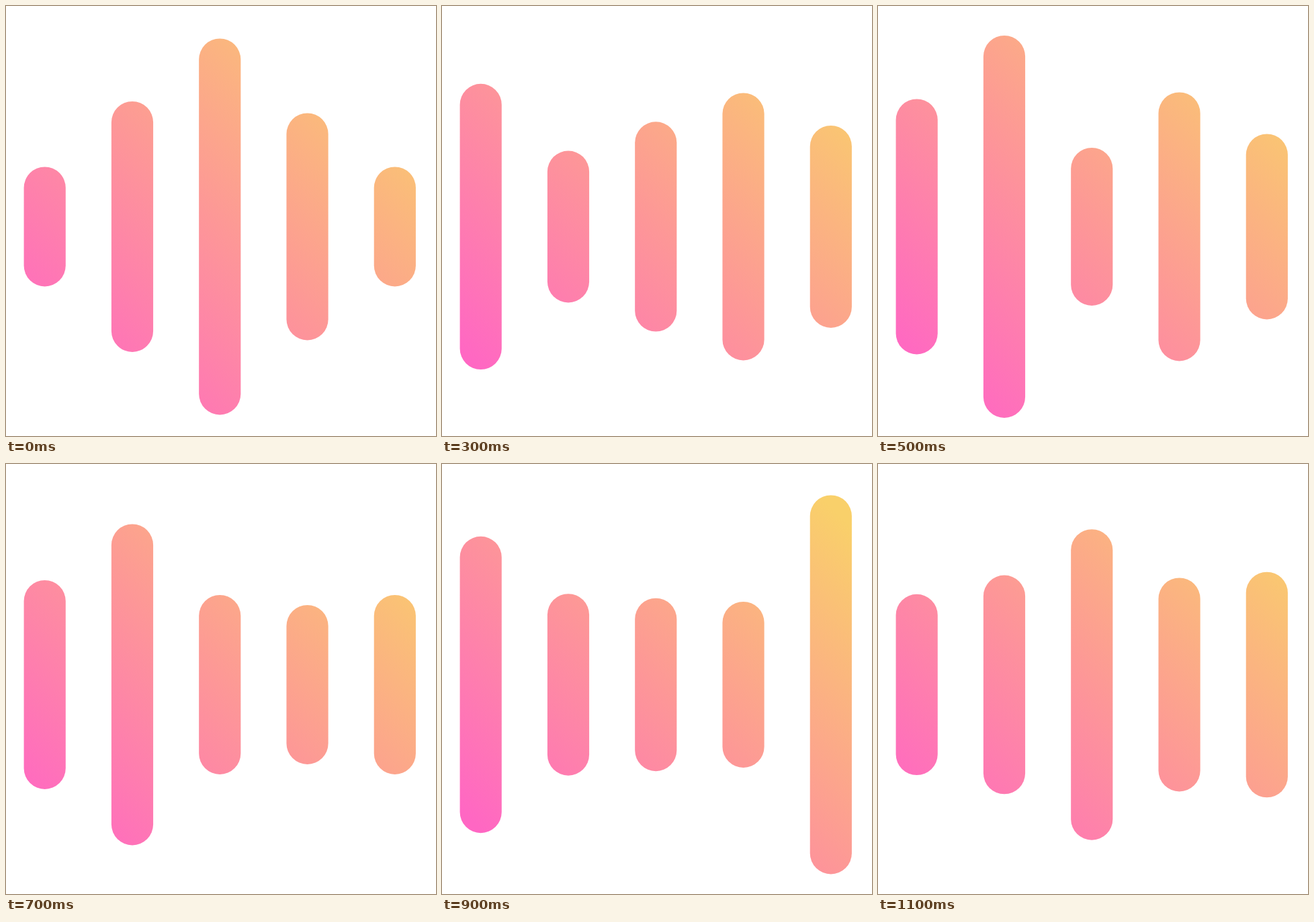
Recreate the animation shown at these times as an HTML page. Size 640 by 640 pixels, loop 1.2 s.

```html
<!DOCTYPE html>
<html lang="en">
<head>
<meta charset="utf-8">
<title>Sound bars</title>
<style>
  html, body { margin: 0; width: 100%; height: 100%; overflow: hidden; background: #fff; }
  svg { display: block; width: 100%; height: 100%; }
</style>
</head>
<body>
<svg viewBox="0 0 640 640">
  <defs>
    <linearGradient id="tint" gradientUnits="userSpaceOnUse" x1="76" y1="564" x2="578" y2="62">
      <stop offset="0" stop-color="#ff67c3"/>
      <stop offset=".475" stop-color="#fd9797"/>
      <stop offset="1" stop-color="#f9d06a"/>
    </linearGradient>
  </defs>
  <g id="bars" fill="url(#tint)"></g>
</svg>
<script>
  const STEP = 100, STEPS = 12;
  const LEFT = 26.6, PITCH = 130.28, WIDTH = 62.2, MID = 328.45;

  // Key heights of each bar at the shared key steps; a spline fills the rest
  const keySteps = [0, 2, 4, 5, 7, 8, 10];
  const keyHeights = [
    [178, 378, 440, 380, 311, 444, 392],
    [373, 251, 267, 569, 478, 314, 269],
    [560, 432, 204, 235, 267, 213, 334],
    [338, 364, 427, 400, 237, 210, 291],
    [178, 289, 296, 276, 267, 533, 510]
  ];

  // Key i of a looping track, counted past either end
  function keyAt(track, i) {
    const n = keySteps.length, k = (i + n) % n;
    return { t: keySteps[k] + Math.floor(i / n) * STEPS, h: track[k] };
  }

  function slopeAt(track, i) {
    const a = keyAt(track, i - 1), b = keyAt(track, i + 1);
    return (b.h - a.h) / (b.t - a.t);
  }

  // Smooth cubic through the keys
  function heightAt(track, step) {
    const i = keySteps.filter(t => t <= step).length - 1;
    const a = keyAt(track, i), b = keyAt(track, i + 1);
    const span = b.t - a.t, u = (step - a.t) / span, v = 1 - u;
    return a.h * v * v * (1 + 2 * u) + b.h * u * u * (1 + 2 * v)
      + span * u * v * (slopeAt(track, i) * v - slopeAt(track, i + 1) * u);
  }

  const group = document.getElementById("bars");
  const bars = keyHeights.map((_, i) => {
    const bar = document.createElementNS("http://www.w3.org/2000/svg", "rect");
    bar.setAttribute("x", LEFT + i * PITCH);
    bar.setAttribute("width", WIDTH);
    bar.setAttribute("rx", WIDTH / 2);
    return group.appendChild(bar);
  });

  function draw(time) {
    const step = Math.floor(time / STEP) % STEPS;
    bars.forEach((bar, i) => {
      const height = heightAt(keyHeights[i], step);
      bar.setAttribute("y", MID - height / 2);
      bar.setAttribute("height", height);
    });
  }

  const start = performance.now();
  function tick() {
    draw(performance.now() - start);
    requestAnimationFrame(tick);
  }
  tick();
</script>
</body>
</html>
```
